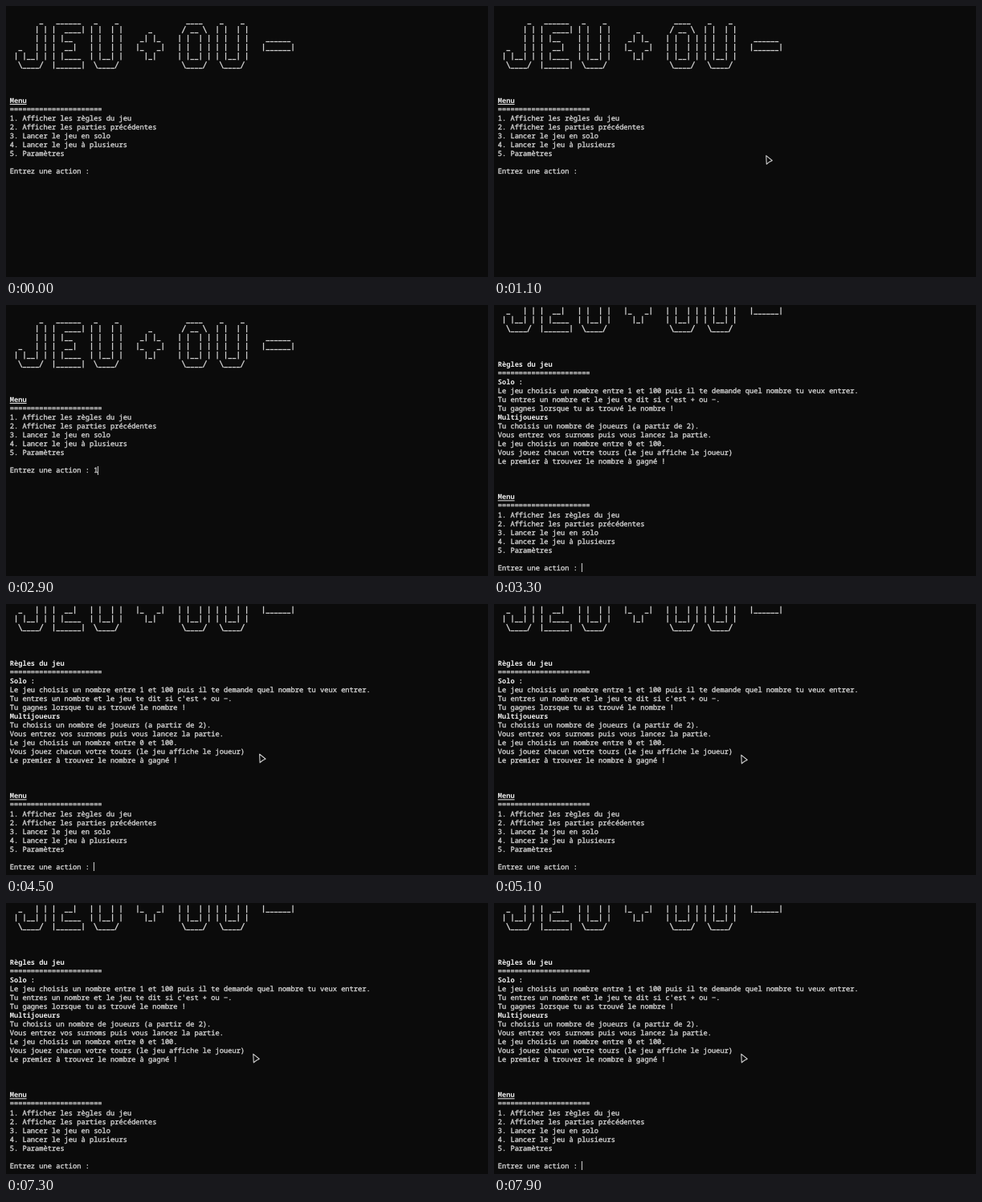
These frames come from a looping animation (600x338 px, 8 s). An HTML page with a canvas:

```html
<!DOCTYPE html>
<html lang="fr">
<head>
<meta charset="utf-8">
<title>Jeu + ou -</title>
<style>
  html, body { margin: 0; width: 100%; height: 100%; overflow: hidden; background: #0b0b0b; }
  canvas { display: block; }
</style>
</head>
<body>
<canvas id="stage" width="600" height="338"></canvas>
<script>
const ctx = document.getElementById("stage").getContext("2d");
const LOOP = 8000;
const LEFT = 4.75, TOP = 2, CELL = 5.22, ROW = 11.04, BASE = 8.6;
const FAMILY = '8.7px "Noto Sans Mono", "DejaVu Sans Mono", monospace';
const BACK = "#0b0b0b", PLAIN = "#cccccc", BRIGHT = "#ececec";

const raw = String.raw;
const glyphs = {
  J: ["      _ ", "     | |", "     | |", " _   | |", "| |__| |", raw` \____/ `],
  E: [" ______ ", "|  ____|", "| |__   ", "|  __|  ", "| |____ ", "|______|"],
  U: [" _    _ ", "| |  | |", "| |  | |", "| |  | |", "| |__| |", raw` \____/ `],
  O: ["  ____  ", raw` / __ \ `, "| |  | |", "| |  | |", "| |__| |", raw` \____/ `],
  "+": ["       ", "   _   ", " _| |_ ", "|_   _|", "  |_|  ", "       "],
  "-": ["        ", "        ", " ______ ", "|______|", "        ", "        "],
  " ": Array(6).fill(" ")
};
const title = [0, 1, 2, 3, 4, 5].map(r =>
  " " + [..."JEU + OU -"].map(c => glyphs[c][r]).join(" "));

// Line segments of the banner characters, inside one cell
const strokes = {
  "|": [2.6, 0.8, 2.6, 10.2],
  "_": [0.2, 9.4, 5, 9.4],
  "/": [4.7, 1, 0.5, 9.8],
  "\\": [0.5, 1, 4.7, 9.8]
};

// "*" marks a bold line, "#" a bold underlined one
const rule = "=".repeat(22);
const gap = ["", "", ""];
const menu = [
  "#Menu", rule,
  "1. Afficher les règles du jeu",
  "2. Afficher les parties précédentes",
  "3. Lancer le jeu en solo",
  "4. Lancer le jeu à plusieurs",
  "5. Paramètres",
  "",
  "Entrez une action : "
];
const rules = [
  "*Règles du jeu", rule,
  "*Solo :",
  "Le jeu choisis un nombre entre 1 et 100 puis il te demande quel nombre tu veux entrer.",
  "Tu entres un nombre et le jeu te dit si c'est + ou −.",
  "Tu gagnes lorsque tu as trouvé le nombre !",
  "*Multijoueurs",
  "Tu choisis un nombre de joueurs (a partir de 2).",
  "Vous entrez vos surnoms puis vous lancez la partie.",
  "Le jeu choisis un nombre entre 0 et 100.",
  "Vous jouez chacun votre tours (le jeu affiche le joueur)",
  "Le premier à trouver le nombre à gagné !"
];
const home = ["", ...title, ...gap, ...menu];
const help = [...title.slice(3), ...gap, ...rules, ...gap, ...menu];

const blinks = [500, 1100, 1700, 2100, 2700, 3900, 4500, 5100, 5700, 6100, 6700, 7300, 7900];
const pointerKeys = [
  [0, null],
  [700, [339.4, 186.6]],
  [900, [338.8, 186.6]],
  [2900, null],
  [4500, [315.6, 187.2]],
  [4700, [307.8, 188.4]]
];

function drawStroke([x1, y1, x2, y2], x, y) {
  ctx.beginPath();
  ctx.moveTo(x + x1, y + y1);
  ctx.lineTo(x + x2, y + y2);
  ctx.strokeStyle = PLAIN;
  ctx.lineWidth = 1.25;
  ctx.stroke();
}

function drawLine(line, row) {
  const mark = line[0] === "*" || line[0] === "#" ? line[0] : "";
  const text = line.slice(mark.length);
  const top = TOP + row * ROW;
  const y = top + BASE;
  ctx.font = (mark ? "700 " : "400 ") + FAMILY;
  ctx.fillStyle = mark ? BRIGHT : PLAIN;
  [...text].forEach((c, i) => {
    const x = LEFT + i * CELL;
    if (strokes[c]) return drawStroke(strokes[c], x, top);
    if (c === " ") return;
    ctx.fillText(c, x, y);
    if (!mark) {
      // Thickens the regular weight to a medium one
      ctx.strokeStyle = PLAIN;
      ctx.lineWidth = 0.4;
      ctx.strokeText(c, x, y);
    }
  });
  if (mark === "#") ctx.fillRect(LEFT, y + 1, text.length * CELL, 1);
}

function drawPointer([x, y]) {
  ctx.beginPath();
  ctx.moveTo(x, y);
  ctx.lineTo(x + 7.5, y + 6.1);
  ctx.lineTo(x + 4, y + 7.8);
  ctx.lineTo(x + 0.5, y + 10.6);
  ctx.closePath();
  ctx.fillStyle = BACK;
  ctx.fill();
  ctx.strokeStyle = PLAIN;
  ctx.lineWidth = 1.1;
  ctx.stroke();
}

function draw(t) {
  ctx.fillStyle = BACK;
  ctx.fillRect(0, 0, 600, 338);
  ctx.textRendering = "geometricPrecision";
  ctx.textBaseline = "alphabetic";
  ctx.lineJoin = "round";

  const lines = t < 3300 ? home : help;
  const typed = t >= 2900 && t < 3300 ? "1" : "";
  const last = lines.length - 1;
  lines.forEach((line, i) => drawLine(i === last ? line + typed : line, i));

  if (blinks.filter(b => b <= t).length % 2) {
    const col = lines[last].length + typed.length;
    ctx.fillStyle = PLAIN;
    ctx.fillRect(Math.round(LEFT + col * CELL - 0.4), Math.round(TOP + last * ROW), 1, 11);
  }

  const spot = pointerKeys.filter(k => k[0] <= t).pop()[1];
  if (spot) drawPointer(spot);
}

const start = performance.now();
function tick() {
  draw((performance.now() - start) % LOOP);
  requestAnimationFrame(tick);
}
tick();
</script>
</body>
</html>
```
